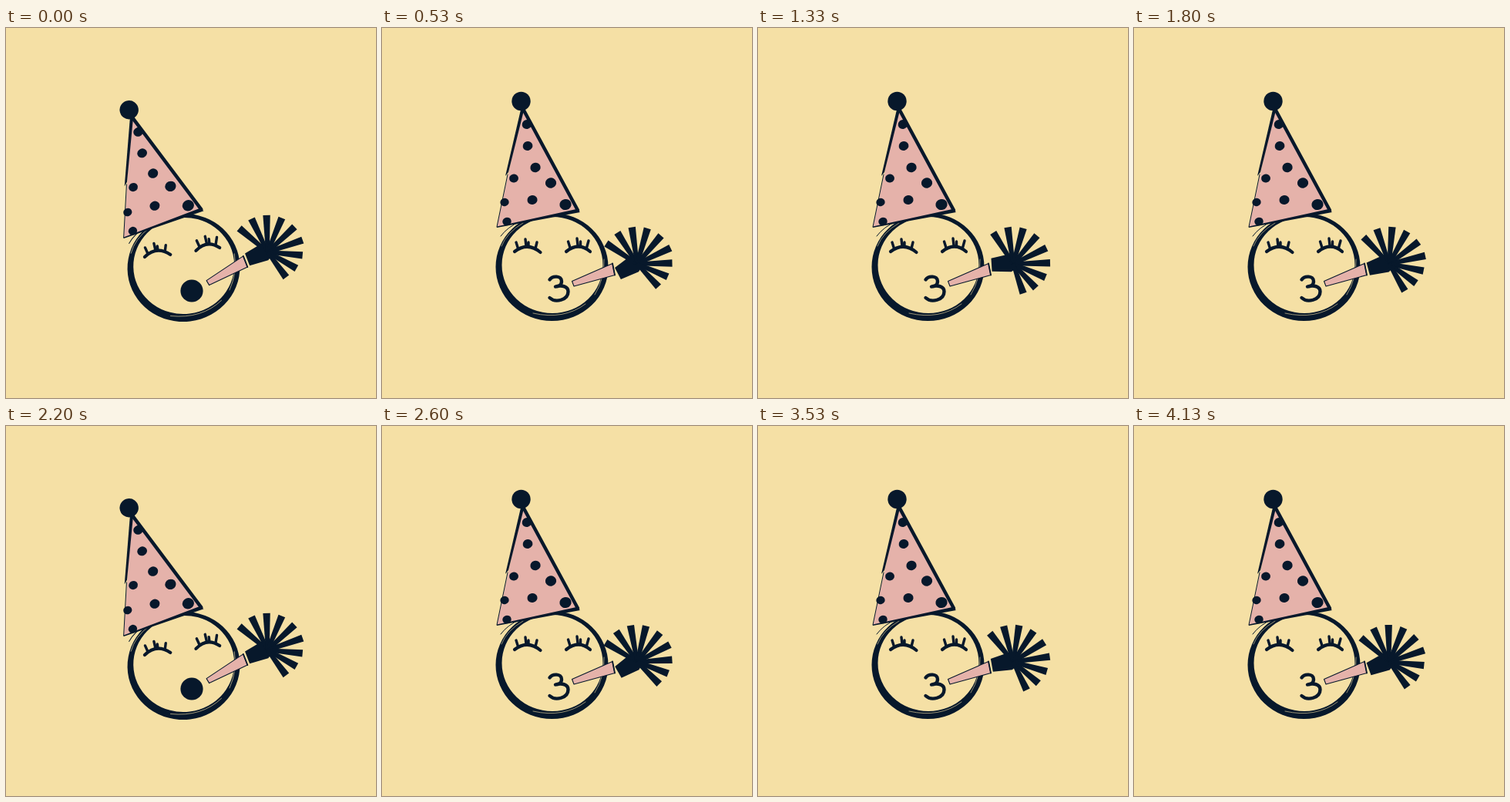
An HTML page for the animation above (4190 ms loop, 480 px wide and 480 px high).

```html
<!DOCTYPE html>
<html lang="en">
<head>
<meta charset="utf-8">
<title>Party face</title>
<style>
  html, body { margin: 0; width: 100%; height: 100%; overflow: hidden; background: #f5e0a5; }
  svg { display: block; width: 100vw; height: 100vh; }
  .ink { fill: #07182b; }
  .pink { fill: #e5b2aa; }
  .line { fill: none; stroke: #07182b; stroke-linecap: round; stroke-linejoin: round; }
  .gap { fill: none; stroke: #f5e0a5; stroke-width: 0.6; stroke-linecap: round; }
</style>
</head>
<body>
<svg viewBox="0 0 480 480">
  <rect width="480" height="480" fill="#f5e0a5"/>

  <g id="face">
    <path class="ink" fill-rule="evenodd" d="
      M147.5 310 A73 70 0 1 1 293.5 310 A73 70 0 1 1 147.5 310 Z
      M155.5 307.5 A65.5 62.5 0 1 0 286.5 307.5 A65.5 62.5 0 1 0 155.5 307.5 Z"/>
    <path class="gap" d="M155 283 Q162 265 183 253"/>
    <path class="gap" d="M196 370 Q236 379 264 358"/>
    <path class="gap" d="M288 300 Q289 325 276 346"/>
    <path class="line" stroke-width="1" d="M154 270 Q163 258 179 251"/>
    <g class="line" stroke-width="4.2">
      <path id="eye" d="M172 290 Q189 277 205.500 291"/>
      <path d="M239 290 Q255 277 270 290"/>
    </g>
    <g class="line" stroke-width="3.4">
      <path d="M174 278 L176.500 286 M186 274 L187 283 M190 278 V283 M201 278 L199 286"/>
      <path d="M241.500 277 L244 285 M253 273 L254 282 M257.500 277 V282 M268 276 L265.500 285"/>
    </g>
  </g>

  <path id="pout" class="line" stroke-width="4.400"
    d="M217.500 326.500 C221 321 233 321 233 328.500 C233 333 229 335.500 225 335.500
       C234 333 241.500 335.500 241.500 342 C241.500 353 225 357 217.500 350"/>
  <circle id="gasp" class="ink" cx="241" cy="341" r="14.600"/>

  <g id="hat">
    <path class="pink" d="M182 106 L256 238 L149 258 Z"/>
    <g id="dots" class="ink"></g>
    <path class="line" stroke-width="4.500" d="M183.500 106 L254 236.500"/>
    <path class="ink" d="M257 239 L149 259 L149 257.500 L252 235 Z"/>
    <path class="ink" d="M180 106 L184 107 L164 187 L160 192 Z"/>
    <path class="line" stroke-width="1" d="M163 190 L149 258"/>
    <circle class="ink" cx="180.500" cy="95" r="12.200"/>
  </g>

  <g id="blower">
    <path class="pink" stroke="#07182b" stroke-width="1.100" stroke-linejoin="round"
      d="M246.500 328.500 L299 305.500 L302 320.500 L249 335 Z"/>
    <path class="line" stroke-width="1.800" d="M299 305.500 L302 320.500"/>
    <g id="fan" class="ink">
      <path d="M303 297 L327 293 L338 295 L343 302 L340 309 L328 316 L303 314 Z"/>
    </g>
  </g>
</svg>

<script>
const LOOP = 4190;
const STEP = 1000 / 15;

// All counted in steps: a quiet lead-in, then spells of puffing that repeat.
const FIRST_PUFF = 8;
const CYCLE = 30.5;
const PUFFING = 24;
const PUFF = 8.1;
const UNROLLED = 4.8;

const SWING = 30;
const REST_ANGLE = -11;
const HUB = [331, 306];
const RAY_COUNT = 9;
const DOTS = [[188, 125], [189, 153], [199, 181], [171, 195], [219, 201],
  [195, 223], [159, 226], [238, 229], [162, 251]];

const byId = id => document.getElementById(id);
const [face, pout, gasp, hat, blower, fan] =
  ['face', 'pout', 'gasp', 'hat', 'blower', 'fan'].map(byId);

const turn = (angle, x, y) => `rotate(${angle} ${x} ${y})`;
const show = (node, visible) => node.setAttribute('display', visible ? 'inline' : 'none');

function dot([x, y]) {
  const r = 5.7 + (x - 160) / 40;
  return `<ellipse cx="${x}" cy="${y}" rx="${r}" ry="${r * 0.92}" transform="${turn(-15, x, y)}"/>`;
}

function ray(_, i) {
  const angle = -119 + 24.2 * i;
  const length = 48 - Math.max(0, i - 5) * 2.5;
  return `<path d="M0 -2.3 L${length} -4.7 V4.7 L0 2.3 Z"
    transform="translate(${HUB}) rotate(${angle})"/>`;
}

byId('dots').innerHTML = DOTS.map(dot).join('');
fan.innerHTML += Array.from({ length: RAY_COUNT }, ray).join('');

function draw(time) {
  const step = Math.floor((time % LOOP + 5) / STEP);
  const beat = (step - FIRST_PUFF) % CYCLE;
  const puffing = beat >= 0 && beat < PUFFING;
  const phase = 2 * Math.PI * (beat - UNROLLED) / PUFF;
  const fanAngle = puffing ? -SWING * (1 - Math.cos(phase)) / 2 : REST_ANGLE;
  const lean = (node, transform) => node.setAttribute('transform', puffing ? '' : transform);

  lean(face, `translate(10 1) ${turn(-7, 220.5, 310)}`);
  lean(hat, `translate(-0.5 -1.5) ${turn(-8.5, 256, 238)}`);
  lean(blower, `translate(14 -1) ${turn(-10, 247, 331)}`);
  show(pout, puffing);
  show(gasp, !puffing);
  fan.setAttribute('transform', turn(fanAngle, ...HUB));
}

const start = performance.now();
function tick() {
  draw(performance.now() - start);
  requestAnimationFrame(tick);
}
tick();
</script>
</body>
</html>
```
